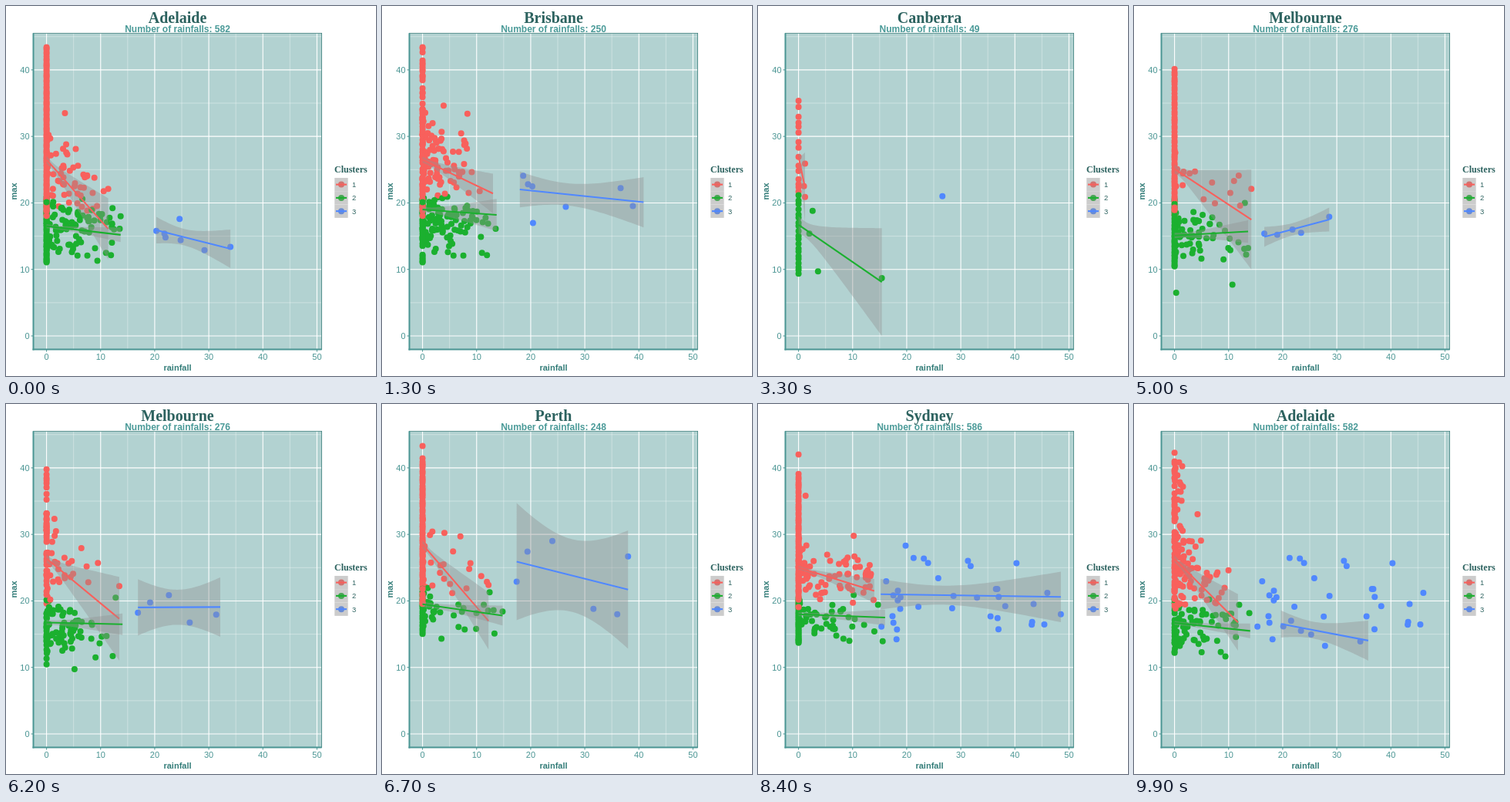
An HTML page with a canvas that plays this animation: 480x480 px, repeating every 10 s.

```html
<!DOCTYPE html>
<html lang="en">
<head>
<meta charset="utf-8">
<title>Rainfall and maximum temperature</title>
<style>
  html, body { margin: 0; width: 100%; height: 100%; overflow: hidden; background: #fff; }
  canvas { display: block; width: 100vw; height: 100vh; }
</style>
</head>
<body>
<canvas id="stage"></canvas>
<script>
const SIZE = 480, LOOP = 10000, STEP = 100, STEPS = 8, SAMPLES = 40;
const STARTS = [900, 2600, 4300, 6000, 7700, 9300];
const COLORS = ['#f8605c', '#1bb02f', '#5088ff'];
const RIBBON = 'rgba(145,145,145,.4)';
const TEAL = '#4a9593', DARK = '#2c625f';
const PANEL = { left: 35.5, top: 35.3, right: 409.6, bottom: 445.6 };
const SANS = '"Liberation Sans", Arial, sans-serif';
const SERIF = '"Liberation Serif", "Times New Roman", serif';

const px = x => 52.6 + 7.016 * x;
const py = y => 428 - 8.628 * y;
const mix = (a, b, t) => a + (b - a) * t;
const mixAll = (a, b, t) => a.map((v, i) => mix(v, b[i], t));

let seed = 7;
function random() {
  seed = (seed + 0x6d2b79f5) | 0;
  let t = Math.imul(seed ^ (seed >>> 15), 1 | seed);
  t = (t + Math.imul(t ^ (t >>> 7), 61 | t)) ^ t;
  return ((t ^ (t >>> 14)) >>> 0) / 2 ** 32;
}

function shuffle(items) {
  for (let i = items.length - 1; i > 0; i--) {
    const j = Math.floor(random() * (i + 1));
    [items[i], items[j]] = [items[j], items[i]];
  }
  return items;
}

// Fit line with confidence band, narrowest where most of the data lies.
function band([x0, y0, x1, y1, left, right]) {
  const narrow = left * (x0 ? 0.62 : 0.9);
  const a = Math.sqrt(left ** 2 - narrow ** 2), b = Math.sqrt(right ** 2 - narrow ** 2);
  return Array.from({ length: SAMPLES + 1 }, (_, i) => {
    const u = i / SAMPLES;
    return [mix(x0, x1, u), mix(y0, y1, u), Math.hypot(narrow, (a + b) * u - a)];
  });
}

// Wet days scatter around the fit line, denser towards its left end.
function wetDays([count, spread], [x0, y0, x1, y1], low, high) {
  return Array.from({ length: count }, () => {
    const u = random() ** (x0 ? 1.5 : 2.2), y = mix(y0, y1, u);
    const bottom = Math.max(low, y - spread), top = Math.min(high, y + spread);
    return [mix(x0, x1, u), mix(bottom, top, (random() + random()) / 2)];
  });
}

// Dry days fill a column at x = 0; golden-ratio steps cover it without gaps.
function dryDays(count, low, high) {
  const start = random();
  return Array.from({ length: count }, (_, i) =>
    [0, mix(low, high, ((start + i * 0.618034) % 1) ** 1.15)]);
}

// fit: [x0, y0, x1, y1, band left, band right]; wet: [count, spread]; dry: [count, low, high]
function cluster({ fit, wet = [0, 0], dry = [0, -Infinity, Infinity], keys = [] }) {
  const [days, low, high] = dry;
  const scatter = fit ? wetDays(wet, fit, low, high) : [];
  return {
    fit: fit && band(fit),
    dots: [...keys, ...shuffle([...scatter, ...dryDays(days, low, high)])]
  };
}

const CITIES = [
  { name: 'Adelaide', count: 582, clusters: [
    { fit: [0, 26.5, 11.4, 16.1, .6, 4.6], wet: [55, 6], dry: [105, 18, 43.5],
      keys: [[3.4, 33.5], [5.4, 28.1], [11.4, 22.1]] },
    { fit: [0, 16.5, 13.7, 15.2, .3, 1.1], wet: [95, 5], dry: [45, 11, 21],
      keys: [[13.7, 18], [9.4, 11.3], [12.2, 19.2]] },
    { fit: [20.3, 15.9, 34, 13.1, 2, 2.9],
      keys: [[24.6, 17.6], [34, 13.4], [29.2, 12.9], [20.3, 15.8], [21.8, 15.4], [22, 14.8], [24.8, 14.4]] }
  ] },
  { name: 'Brisbane', count: 250, clusters: [
    { fit: [0, 26.5, 14, 24.6, .4, 2], wet: [45, 8], dry: [50, 20, 36],
      keys: [[4.2, 35.3], [9.5, 29.4]] },
    { fit: [0, 20.5, 13.7, 20, .5, 3.2], wet: [40, 6], dry: [30, 13, 24] },
    { fit: [16.6, 25.7, 45, 24.3, 3.1, 4.3],
      keys: [[17.7, 25.4], [38.2, 27.5], [44.7, 23.5], [20.5, 17.7], [16.7, 29.3], [18, 27.6], [27.5, 22.4]] }
  ] },
  { name: 'Canberra', count: 49, clusters: [
    { fit: [0, 26.9, 1.2, 22.3, 1.2, 5.3], dry: [15, 20.8, 35.4],
      keys: [[1.2, 25.9], [1, 22.5], [1.2, 20.9]] },
    { fit: [0, 16.7, 15.4, 8.1, 1.3, 8.1], dry: [20, 8.8, 21.5],
      keys: [[15.4, 8.7], [3.6, 9.7], [2.6, 18.8], [2, 15.4]] },
    { keys: [[26.6, 21]] }
  ] },
  { name: 'Melbourne', count: 276, clusters: [
    { fit: [0, 25.1, 14.2, 17.5, .7, 7.5], wet: [16, 6], dry: [60, 18, 40.3],
      keys: [[11, 23.3], [14.2, 22.1]] },
    { fit: [0, 15.1, 13.6, 15.7, .4, 1.7], wet: [60, 5], dry: [35, 10.4, 20.8],
      keys: [[10.7, 7.7], [.3, 6.5], [13, 20], [13.6, 13.2]] },
    { fit: [16.6, 14.9, 28.6, 17.5, 1.5, 1.8],
      keys: [[16.6, 15.4], [19, 15.2], [21.8, 16], [23.4, 15.5], [28.6, 17.9]] }
  ] },
  { name: 'Perth', count: 248, clusters: [
    { fit: [0, 28.5, 12.2, 17, .6, 4.3], wet: [26, 8], dry: [70, 19.5, 41.6],
      keys: [[7, 29.7], [12.2, 22.4], [0, 43.3]] },
    { fit: [0, 19.5, 14.8, 17.8, .4, 1.5], wet: [38, 4], dry: [20, 15, 22],
      keys: [[14.8, 18.4], [13.3, 15.1], [12.4, 21.3], [3.5, 14.3]] },
    { fit: [17.4, 25.9, 38, 21.7, 8.8, 8.9],
      keys: [[17.4, 22.9], [19.4, 27.4], [24, 29], [31.6, 18.8], [36, 18], [38, 26.7]] }
  ] },
  { name: 'Sydney', count: 586, clusters: [
    { fit: [0, 25, 14, 21.5, .3, 1.8], wet: [85, 5], dry: [65, 19, 39.2],
      keys: [[10.2, 29.8], [1.3, 35.8], [0, 42]] },
    { fit: [0, 18, 16, 17.5, .3, 1.2], wet: [48, 4], dry: [36, 13.6, 20.5],
      keys: [[14.7, 19.4], [9.4, 14], [10.2, 20.9]] },
    { fit: [15.2, 21, 48.5, 20.6, 2.3, 3.8], wet: [29, 9],
      keys: [[48.5, 18], [36.8, 17.4], [18.2, 15.7], [18.8, 18.8], [19.8, 28.3], [33, 20.5], [28.4, 18.9]] }
  ] }
].map(city => ({ ...city, clusters: city.clusters.map(cluster) }));

const canvas = document.getElementById('stage');
const ctx = canvas.getContext('2d');
const ratio = window.devicePixelRatio || 1;
canvas.width = canvas.height = SIZE * ratio;
ctx.scale(ratio, ratio);

function text(str, x, y, font, color, align = 'center') {
  ctx.font = font;
  ctx.fillStyle = color;
  ctx.textAlign = align;
  ctx.fillText(str, x, y);
}

function segment(x0, y0, x1, y1, color, width) {
  ctx.strokeStyle = color;
  ctx.lineWidth = width;
  ctx.beginPath();
  ctx.moveTo(x0, y0);
  ctx.lineTo(x1, y1);
  ctx.stroke();
}

function disc(x, y, color) {
  ctx.fillStyle = color;
  ctx.beginPath();
  ctx.arc(x, y, 4, 0, 2 * Math.PI);
  ctx.fill();
}

function drawGrid() {
  const { left, top, right, bottom } = PANEL;
  ctx.fillStyle = '#b2d2d1';
  ctx.fillRect(left, top, right - left, bottom - top);
  const grid = (offset, color, width) => {
    for (let v = offset; v <= 50; v += 10) {
      if (v <= 45) segment(left, py(v), right, py(v), color, width);
      segment(px(v), top, px(v), bottom, color, width);
    }
  };
  grid(5, 'rgba(255,255,255,.65)', 0.55);
  grid(0, '#fff', 1.1);
}

function drawFrame() {
  const { left, top, right, bottom } = PANEL;
  ctx.strokeStyle = '#3a7d7a';
  ctx.lineWidth = 0.8;
  ctx.strokeRect(left, top, right - left, bottom - top);
  segment(left, top, left, bottom + 1, TEAL, 2);
  segment(left - 1, bottom, right, bottom, TEAL, 2);
  for (let v = 0; v <= 50; v += 10) {
    segment(px(v), bottom, px(v), bottom + 3, TEAL, 1);
    text(v, px(v), 459, '11px ' + SANS, TEAL);
    if (v > 40) continue;
    segment(left - 3, py(v), left, py(v), TEAL, 1);
    text(v, 30.5, py(v) + 4, '11px ' + SANS, TEAL, 'right');
  }
  text('rainfall', 222.5, 473, 'bold 11px ' + SANS, '#347d79');
  ctx.save();
  ctx.translate(13.5, 240.5);
  ctx.rotate(-Math.PI / 2);
  text('max', 0, 0, 'bold 11px ' + SANS, '#347d79');
  ctx.restore();
}

function drawLegend() {
  const left = 426.3, size = 17.28;
  text('Clusters', 426, 216, 'bold 12px ' + SERIF, DARK, 'left');
  COLORS.forEach((color, i) => {
    const y = 231.6 + size * i;
    const key = fill => {
      ctx.fillStyle = fill;
      ctx.fillRect(left, y - size / 2, size, size);
    };
    key('#f2f2f2');
    disc(435, y, color);
    key(RIBBON);
    segment(428, y, 442, y, color, 2.1);
    text(i + 1, 449, y + 3.4, '9.4px ' + SANS, DARK, 'left');
  });
}

function drawFit(fit, color) {
  const edge = (rows, side) => rows.forEach(([x, y, h]) => ctx.lineTo(px(x), py(y + side * h)));
  ctx.fillStyle = RIBBON;
  ctx.beginPath();
  edge(fit, 1);
  edge([...fit].reverse(), -1);
  ctx.fill();
  const [x0, y0] = fit[0], [x1, y1] = fit[SAMPLES];
  segment(px(x0), py(y0), px(x1), py(y1), color, 2.1);
}

// Paired items glide; unpaired ones leave or appear only when the move is complete.
function tween(from, to, t) {
  if (t === 1) return to;
  return {
    fit: from.fit && to.fit ? from.fit.map((row, i) => mixAll(row, to.fit[i], t)) : from.fit,
    dots: from.dots.map((dot, i) => to.dots[i] ? mixAll(dot, to.dots[i], t) : dot)
  };
}

function draw(index, step) {
  const from = CITIES[index], to = CITIES[(index + 1) % CITIES.length];
  const shown = step >= STEPS / 2 ? to : from;
  const groups = from.clusters.map((c, i) => tween(c, to.clusters[i], step / STEPS));

  ctx.fillStyle = '#fff';
  ctx.fillRect(0, 0, SIZE, SIZE);
  drawGrid();

  ctx.save();
  ctx.beginPath();
  ctx.rect(PANEL.left, PANEL.top, PANEL.right - PANEL.left, PANEL.bottom - PANEL.top);
  ctx.clip();
  const longest = Math.max(...groups.map(g => g.dots.length));
  for (let i = 0; i < longest; i++) {
    groups.forEach(({ dots }, g) => {
      if (dots[i]) disc(px(dots[i][0]), py(dots[i][1]), COLORS[g]);
    });
  }
  groups.forEach(({ fit }, g) => fit && drawFit(fit, COLORS[g]));
  ctx.restore();

  drawFrame();
  drawLegend();
  text(shown.name, 222.5, 22, 'bold 20px ' + SERIF, DARK);
  text('Number of rainfalls: ' + shown.count, 222.5, 34, 'bold 12px ' + SANS, '#4a9a98');
}

let lastTick = -1;
function play() {
  const time = performance.now() % LOOP;
  const tick = Math.floor(time / STEP);
  if (tick !== lastTick) {
    lastTick = tick;
    const index = Math.max(0, STARTS.filter(start => time >= start).length - 1);
    const step = Math.floor((time - STARTS[index]) / STEP) + 1;
    draw(index, Math.min(STEPS, Math.max(0, step)));
  }
  requestAnimationFrame(play);
}
play();
</script>
</body>
</html>
```
